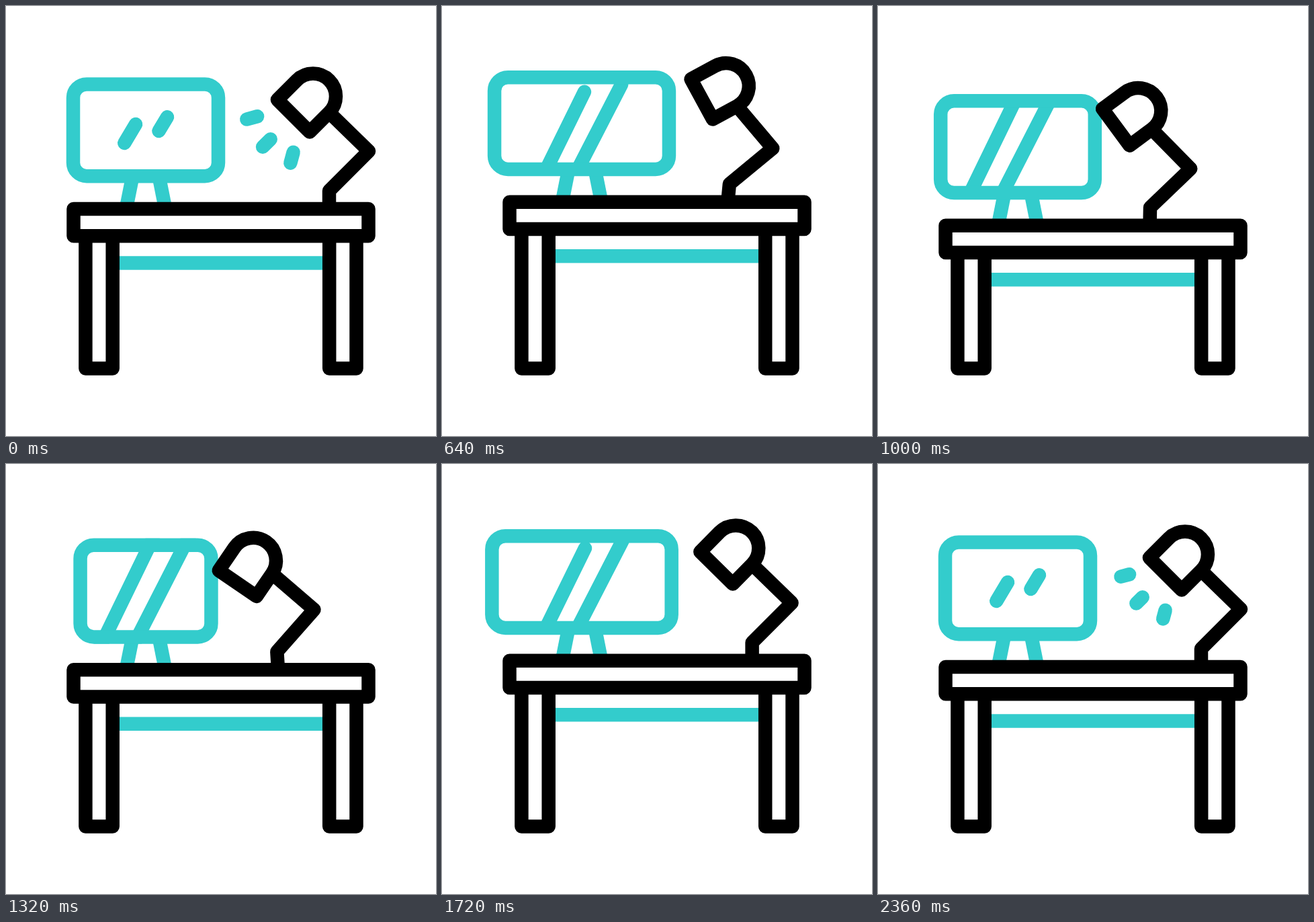
Write an HTML page with a canvas that moves like this. It is 640 px wide and 640 px high and loops after 2.4 s.

```html
<!DOCTYPE html>
<html lang="en">
<head>
<meta charset="utf-8">
<title>Dancing desk</title>
<style>
  html, body { margin: 0; height: 100%; overflow: hidden; background: #fff; }
  canvas { display: block; width: 640px; height: 640px; }
</style>
</head>
<body>
<canvas id="stage" width="640" height="640"></canvas>
<script>
const ctx = document.getElementById('stage').getContext('2d');
const LOOP = 2400, STEP = 40, BEAT = 500, TEAL = '#33cccc', BLACK = '#000';

const radians = degrees => degrees * Math.PI / 180;
const clamp = u => Math.min(1, Math.max(0, u));
const mix = (a, b, u) => a + (b - a) * u;

// Eased 0 to 1 between two times.
const ramp = (t, from, to) => (1 - Math.cos(Math.PI * clamp((t - from) / (to - from)))) / 2;

// Leaves 0, reaches the first value at `first` after `rise` ms, then one value per beat.
function swing(t, first, rise, ...values) {
  return values.reduce((sum, value, i) => {
    const end = first + i * BEAT;
    return sum + (value - (values[i - 1] || 0)) * ramp(t, end - (i ? BEAT : rise), end);
  }, 0);
}

function line(...points) {
  ctx.beginPath();
  for (let i = 0; i < points.length; i += 2) ctx.lineTo(points[i], points[i + 1]);
  ctx.stroke();
}

function drawMonitor(halfWidth) {
  for (const side of [-1, 1]) line(208 + side * 20.5, 258, 208 + side * 29.3, 302);
  ctx.beginPath();
  ctx.roundRect(208 - halfWidth, 116.5, halfWidth * 2, 136.7, 20);
  ctx.stroke();
}

// The reflections stay put while the screen around them moves.
function drawReflections(lift, halfWidth, shine) {
  ctx.save();
  ctx.beginPath();
  ctx.roundRect(198 - halfWidth, 106.5 + lift, halfWidth * 2 + 20, 156.7, 30);
  ctx.clip();
  ctx.lineCap = 'round';
  line(mix(193, 218.5, shine), mix(176, 111, shine), mix(176.3, 131, shine), mix(204, 291, shine));
  line(mix(240, 276.5, shine), mix(165.3, 100, shine), mix(227.5, 187, shine), mix(186, 275, shine));
  ctx.restore();
}

function drawRays(size) {
  if (size <= 0) return;
  ctx.save();
  ctx.lineCap = 'round';
  ctx.translate(447.2, 144.7);
  for (const angle of [105, 135, 165]) {
    const x = Math.cos(radians(angle)), y = Math.sin(radians(angle));
    const near = 75.6, far = near + 16.5 * size;
    line(x * near, y * near, x * far, y * far);
  }
  ctx.restore();
}

function drawLamp(slide, lean, nod) {
  ctx.save();
  ctx.translate(481 - slide, 302);
  ctx.rotate(radians(lean));
  line(0, 0, 0, -27, 59, -86, 0, -143.5);
  ctx.translate(0, -143.5);
  ctx.rotate(radians(45 + nod));
  ctx.beginPath();
  ctx.arc(-34, 0, 34, 0, Math.PI, true);
  ctx.lineTo(-68, 41);
  ctx.lineTo(0, 41);
  ctx.closePath();
  ctx.stroke();
  ctx.restore();
}

function drawDesk(lift) {
  const top = 302 + lift, bottom = top + 40.2, floor = 539.6;
  ctx.strokeStyle = TEAL;
  line(160, bottom + 40.2, 480, bottom + 40.2);
  ctx.strokeStyle = BLACK;
  for (const x of [118.4, 481.2])
    line(x, bottom, x, floor, x + 40.3, floor, x + 40.3, bottom);
  ctx.strokeRect(100.5, top, 439, bottom - top);
}

function draw(t) {
  const lift = swing(t, 550, 320, -13.3, 25.8, -12.5, 0);
  const halfWidth = 108 + swing(t, 750, 425, 26, -12.4, 26, 0);
  const lean = swing(t, 750, 500, 6.2, -3.8, 0);
  const nod = swing(t, 800, 460, 15, -7, 0);
  const slide = 76.5 * (ramp(t, 90, 935) - ramp(t, 1285, 1940));
  const shine = ramp(t, 45, 945) - ramp(t, 1550, 2100);

  ctx.fillStyle = '#fff';
  ctx.fillRect(0, 0, 640, 640);
  ctx.lineWidth = 20.5;
  ctx.lineJoin = 'round';

  ctx.strokeStyle = TEAL;
  drawRays(Math.max(1 - t / 200, (t - 2200) / 200));
  drawReflections(lift, halfWidth, shine);

  ctx.save();
  ctx.translate(0, lift);
  drawMonitor(halfWidth);
  ctx.strokeStyle = BLACK;
  drawLamp(slide, lean, nod);
  ctx.restore();

  drawDesk(lift);
}

const start = performance.now();
function tick() {
  const t = (performance.now() - start) % LOOP;
  draw(Math.floor(t / STEP) * STEP);
  requestAnimationFrame(tick);
}
tick();
</script>
</body>
</html>
```
